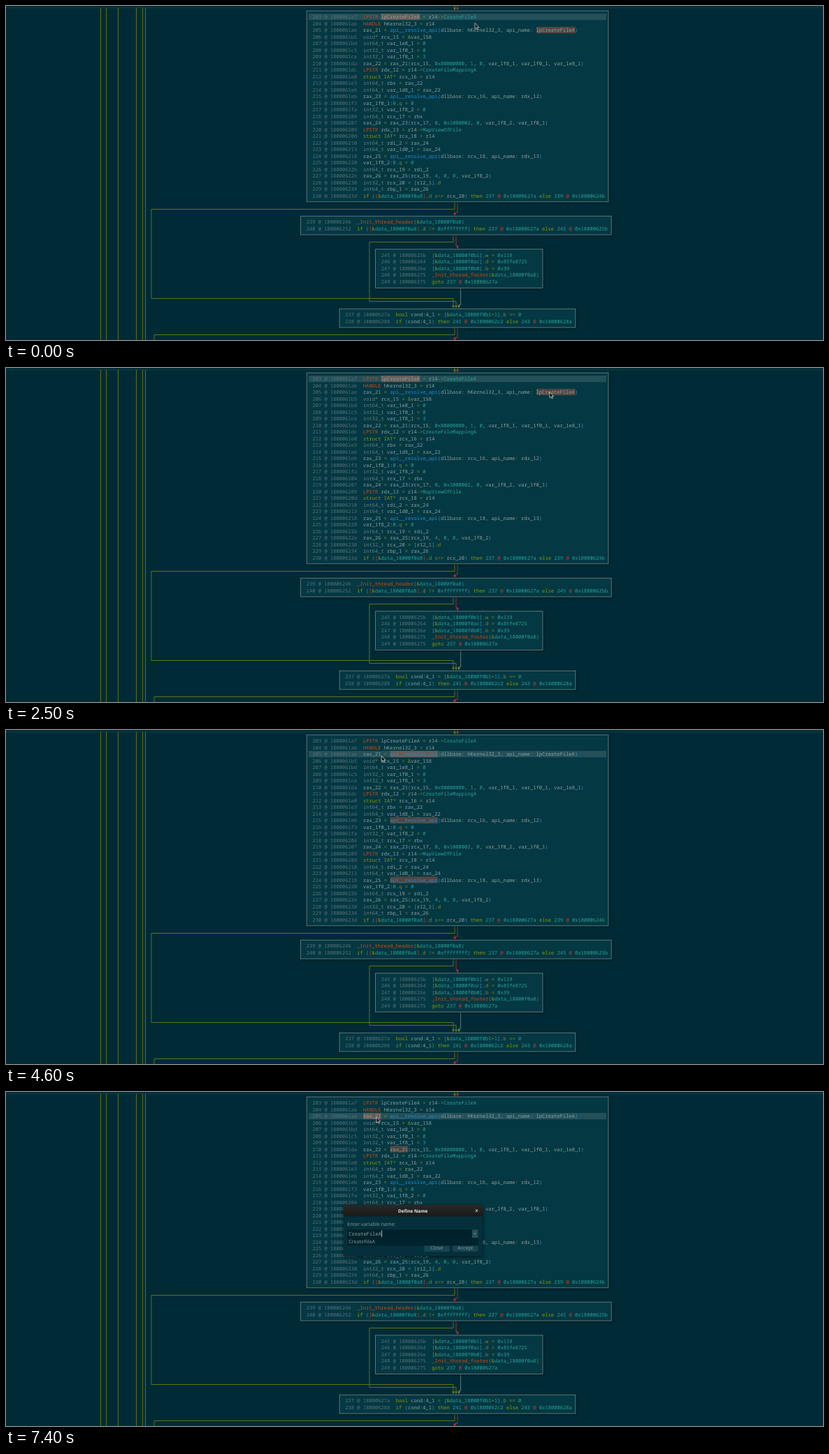
These frames come from a looping animation (1169x479 px, 8000 ms). An HTML page:

```html
<!DOCTYPE html>
<html lang="en">
<head>
<meta charset="utf-8">
<title>Code graph</title>
<style>
  html, body { margin: 0; width: 100%; height: 100%; overflow: hidden; background: #002b36; }
  svg { display: block; width: 100%; height: 100%; }
  text { white-space: pre; text-rendering: geometricPrecision; }
  .code { font: 7.125px "Noto Sans Mono", "DejaVu Sans Mono", monospace; fill: #8d9fa0; }
  .ui { font: 7.15px "Noto Sans", "Open Sans", sans-serif; fill: #839496; }
  .title { font-weight: 700; font-size: 6.5px; fill: #eee; }
  .addr { fill: #587178; }
  .func { fill: #268bd2; }
  .type { fill: #cb4b16; }
  .word { fill: #8a9a08; }
  .prim { fill: #648083; }
  .num { fill: #2aa198; }
  .at { fill: #c83a35; }
  .paren { fill: #3d93b5; }
  .op { fill: #7d8c2a; }
  .node { fill: #043842; stroke: #647f84; stroke-width: .9; filter: drop-shadow(1px 1px 1.5px #0007); }
  .edge { fill: none; stroke-width: .9; }
</style>
</head>
<body>
<svg id="stage" viewBox="0 0 1169 479"></svg>
<script>
const NS = "http://www.w3.org/2000/svg";
const stage = document.getElementById("stage");
const CHAR = 4.275, ROW = 9.5, LOOP = 8000;
const OLIVE = "#6c7a0e", RED = "#b0302e", GREY = "#63807f";

function add(parent, tag, attrs = {}, text) {
  const el = document.createElementNS(NS, tag);
  for (const k in attrs) el.setAttribute(k, attrs[k]);
  if (text !== undefined) el.textContent = text;
  parent.append(el);
  return el;
}
const group = (parent = stage) => add(parent, "g");
const rect = (parent, x, y, width, height, attrs) =>
  add(parent, "rect", { x, y, width, height, ...attrs });
const label = (parent, x, y, text, cls = "ui", attrs) =>
  add(parent, "text", { x, y, class: cls, ...attrs }, text);
const show = (el, on) => el.setAttribute("visibility", on ? "visible" : "hidden");

// Syntax colouring: one named group per class
const SYNTAX = new RegExp([
  "(?<func>api__\\w+)",
  "(?<type>_Init\\w+|LPSTR|HANDLE)",
  "(?<word>\\b(?:struct|IAT|if|then|else|goto|bool)\\b)",
  "(?<prim>int\\d+_t|void)",
  "(?<num>data_\\w+|(?<=->)\\w+|\\b0x\\w+|\\b\\d+\\b)",
  "(?<at>@|(?<=\\()\\[|\\](?=\\.d [s!]))",
  "(?<paren>[()\\[\\]])",
  "(?<op>->|s<=|!=|==|[=&*+]|(?<=\\.)[bdqw]\\b)"
].join("|"), "g");

function codeLine(parent, x, y, line) {
  const el = label(parent, x, y, "", "code");
  const span = (s, cls) => s && add(el, "tspan", cls ? { class: cls } : {}, s);
  const [, head, body] = line.match(/^(\d+ \w+) (.*)$/);
  span(head.replace(" ", " @ ") + "  ", "addr");
  let at = 0;
  for (const m of body.matchAll(SYNTAX)) {
    span(body.slice(at, m.index));
    span(m[0], Object.keys(m.groups).find(k => m.groups[k]));
    at = m.index + m[0].length;
  }
  span(body.slice(at));
}

const MAIN = `203 1800061a7 LPSTR lpCreateFileA = r14->CreateFileA
204 1800061ab HANDLE hKernel32_3 = r14
205 1800061ae rax_21 = api__resolve_api(dllbase: hKernel32_3, api_name: lpCreateFileA)
206 1800061b5 void* rcx_15 = &var_158
207 1800061bd int64_t var_1e8_1 = 0
208 1800061c5 int32_t var_1f0_1 = 0
209 1800061ce int32_t var_1f8_1 = 3
210 1800061da rax_22 = rax_21(rcx_15, 0x80000000, 1, 0, var_1f8_1, var_1f0_1, var_1e8_1)
211 1800061dc LPSTR rdx_12 = r14->CreateFileMappingA
212 1800061e0 struct IAT* rcx_16 = r14
213 1800061e3 int64_t rbx = rax_22
214 1800061e6 int64_t var_1d8_1 = rax_22
215 1800061eb rax_23 = api__resolve_api(dllbase: rcx_16, api_name: rdx_12)
216 1800061f3 var_1f0_1:0.q = 0
217 1800061fa int32_t var_1f8_2 = 0
218 180006204 int64_t rcx_17 = rbx
219 180006207 rax_24 = rax_23(rcx_17, 0, 0x1000002, 0, var_1f8_2, var_1f0_1)
220 180006209 LPSTR rdx_13 = r14->MapViewOfFile
221 18000620d struct IAT* rcx_18 = r14
222 180006210 int64_t rdi_2 = rax_24
223 180006213 int64_t var_1d0_1 = rax_24
224 180006218 rax_25 = api__resolve_api(dllbase: rcx_18, api_name: rdx_13)
225 180006220 var_1f8_2:0.q = 0
226 18000622b int64_t rcx_19 = rdi_2
227 18000622e rax_26 = rax_25(rcx_19, 4, 0, 0, var_1f8_2)
228 180006230 int32_t rcx_20 = [r12_1].d
229 180006234 int64_t rbp_1 = rax_26
230 18000623d if ([&data_18000f0a8].d s<= rcx_20) then 237 @ 0x18000627a else 239 @ 0x180006246`.split("\n");
const HEADER = `239 180006246 _Init_thread_header(&data_18000f0a8)
240 180006252 if ([&data_18000f0a8].d != 0xffffffff) then 237 @ 0x18000627a else 245 @ 0x18000625b`.split("\n");
const FOOTER = `245 18000625b [&data_18000f0b1].w = 0x119
246 180006264 [&data_18000f0ac].d = 0x85fe8725
247 18000626e [&data_18000f0b0].b = 0x39
248 180006275 _Init_thread_footer(&data_18000f0a8)
249 180006275 goto 237 @ 0x18000627a`.split("\n");
const COND = `237 18000627a bool cond:4_1 = [&data_18000f0b1+1].b == 0
238 180006288 if (cond:4_1) then 241 @ 0x1800062c2 else 243 @ 0x18000628a`.split("\n");

// Graph edges
const edge = (d, stroke) => add(stage, "path", { d, stroke, class: "edge" });
const arrow = (x, y, fill) => add(stage, "path", { d: `M${x - 2} ${y - 4}h4l-2 4z`, fill });

edge("M0 2.5H1169", "#0b434c");
edge([135.5, 143.5, 160.5, 186.5, 195.5, 199.5].map(x => `M${x} 2.5V479`).join(""), OLIVE);
edge("M642 0V4", OLIVE);
edge("M646 0V4", RED);
edge("M642 281V291.5H208V419.5H640V431", OLIVE);
edge("M646 281V296H642V299", RED);
edge("M640 328V338.5H520V423.5H644V431", OLIVE);
edge("M644 328V343.5H646V346", RED);
edge("M650.5 404V428.5H648V431", GREY);
edge("M642 461V471.5H212V479", OLIVE);
edge("M646 461V475.5H642V479", RED);
arrow(642, 6.5, OLIVE);
arrow(646, 6.5, RED);
arrow(642, 301, RED);
arrow(646, 348.5, RED);
arrow(640, 433.5, OLIVE);
arrow(644, 433.5, OLIVE);
arrow(648, 433.5, GREY);
arrow(642, 480, RED);

// Graph nodes; "between" draws what lies under the text
function node(x, y, w, h, lines, between) {
  rect(stage, x, y, w, h, { class: "node" });
  const extra = between && between();
  lines.forEach((s, i) => codeLine(stage, x + 8.1, y + 11.1 + i * ROW, s));
  return extra;
}

// Marks every use of a word in the main node
function marks(word) {
  const g = group();
  MAIN.forEach((line, i) => {
    for (const m of line.matchAll(new RegExp(`\\b${word}\\b`, "g")))
      rect(g, 438.4 + (m.index + 3) * CHAR, 10.8 + i * ROW, word.length * CHAR, 9.3, { fill: "#514640" });
  });
  return g;
}

const ui = node(430.3, 7, 431.6, 273.8, MAIN, () => ({
  file: marks("lpCreateFileA"),
  api: marks("api__resolve_api"),
  rax: marks("rax_21"),
  bar: rect(stage, 433, 11, 426, 9.2, { fill: "#fff", opacity: .12 })
}));
node(421.6, 301.3, 444.6, 26.8, HEADER);
node(528.6, 348.8, 239.4, 55.6, FOOTER);
node(477.2, 434.3, 337.6, 26.8, COND);

// Hover tip
const tip = group();
rect(tip, 537.5, 34.5, 70, 32, { fill: "#02303b", stroke: "#40616a", "stroke-width": .8 });
const tipText = label(tip, 542.5, 53, "", "code");
add(tipText, "tspan", { class: "prim" }, "int64_t");
add(tipText, "tspan", {}, " rax_21");

// Rename dialog
const dialog = group();
const shade = add(add(stage, "defs"), "linearGradient", { id: "bar", x2: 0, y2: 1 });
add(shade, "stop", { "stop-color": "#282828" });
add(shade, "stop", { offset: 1, "stop-color": "#191919" });
rect(dialog, 483, 162, 199, 73.5, { rx: 2.5, fill: "#03303b", style: "filter:drop-shadow(0 1.5px 2px #000a)" });
add(dialog, "path", { d: "M483 178.5V165q0-3 3-3H679q3 0 3 3V178.5z", fill: "url(#bar)" });
label(dialog, 582.2, 172.8, "Define Name", "ui title", { "text-anchor": "middle" });
add(dialog, "path", { d: "M671.7 168.5l3.4 3.4m0-3.4l-3.4 3.4", stroke: "#eee" });
label(dialog, 488.3, 192, "Enter variable name:");
rect(dialog, 488.4, 197.4, 187, 12, { fill: "#00212b" });
rect(dialog, 667, 197.4, 8.4, 12, { fill: "#27505b" });
add(dialog, "path", { d: "M669.6 202.5h3l-1.5 2z", fill: "#839496" });
for (const [x, name] of [[598, "Close"], [639, "Accept"]]) {
  rect(dialog, x, 217.5, 36.5, 11.6, { rx: 1, fill: "#164450", stroke: "#0c3944", "stroke-width": .7 });
  label(dialog, x + 18.2, 225.9, name, "ui", { "text-anchor": "middle" });
}
const field = label(dialog, 490.2, 206, "", "code", { style: "fill:#93a1a1" });
const caret = rect(dialog, 516, 198.4, .9, 9.6, { fill: "#c3cccc" });
const list = group(dialog);
rect(list, 488.6, 209.2, 187, 11.2, { fill: "#00232d" });
label(list, 490.2, 217, "CreateFileA");

const pointer = add(stage, "path", {
  d: "M0 0V8.2L1.9 6.5 3.2 9.3 4.6 8.7 3.3 6H5.7Z",
  fill: "#111", stroke: "#e8e8e8", "stroke-width": .7
});

// Pointer path: time, x, y
const PATH = [
  [0, 671, 24.5], [100, 671, 24.5], [300, 657.5, 20.5], [400, 657.5, 20.5], [600, 654.5, 14.5],
  [700, 654.5, 14.5], [1100, 614, 8.5], [1400, 575, 18], [1700, 575, 18], [2100, 680, 42],
  [2500, 777.8, 34.5], [2600, 777.3, 34.3], [2800, 777.3, 34.3], [2900, 694.5, 34.5], [3000, 694.5, 34.5],
  [3400, 592.8, 33], [3500, 592.8, 33], [3800, 592, 34.2], [3900, 592, 34.2], [4000, 591.5, 34.6],
  [4300, 591.5, 34.6], [4600, 537.3, 37], [4800, 527.8, 35.5], [5200, 527.8, 35.5], [5400, 530, 36]
];

function pointerAt(t) {
  const i = PATH.findIndex(p => p[0] > t);
  if (i < 0) return PATH[PATH.length - 1].slice(1);
  const a = PATH[i - 1], b = PATH[i], k = (t - a[0]) / (b[0] - a[0]);
  return [a[1] + (b[1] - a[1]) * k, a[2] + (b[2] - a[2]) * k];
}

function draw(time) {
  const t = Math.floor(time / 100) * 100;
  const within = (a, b = LOOP) => t >= a && t < b;
  pointer.setAttribute("transform", `translate(${pointerAt(t)})`);
  ui.bar.setAttribute("y", within(2900) ? 30 : 11);
  show(ui.file, within(0, 1500) || within(1700, 4200));
  show(ui.api, within(4300, 5200));
  show(ui.rax, within(5300));
  show(tip, within(6100, 6600));

  const open = within(6600), typed = within(7400);
  dialog.setAttribute("display", open ? "inline" : "none");
  field.textContent = typed ? "CreateFileA" : "rax_21";
  caret.setAttribute("x", typed ? 537.2 : 516);
  show(caret, open && !within(7200, 7400));
  show(list, typed);
}

const start = performance.now();
function tick(now) {
  draw(Math.max(0, now - start) % LOOP);
  requestAnimationFrame(tick);
}
draw(0);
requestAnimationFrame(tick);
</script>
</body>
</html>
```
